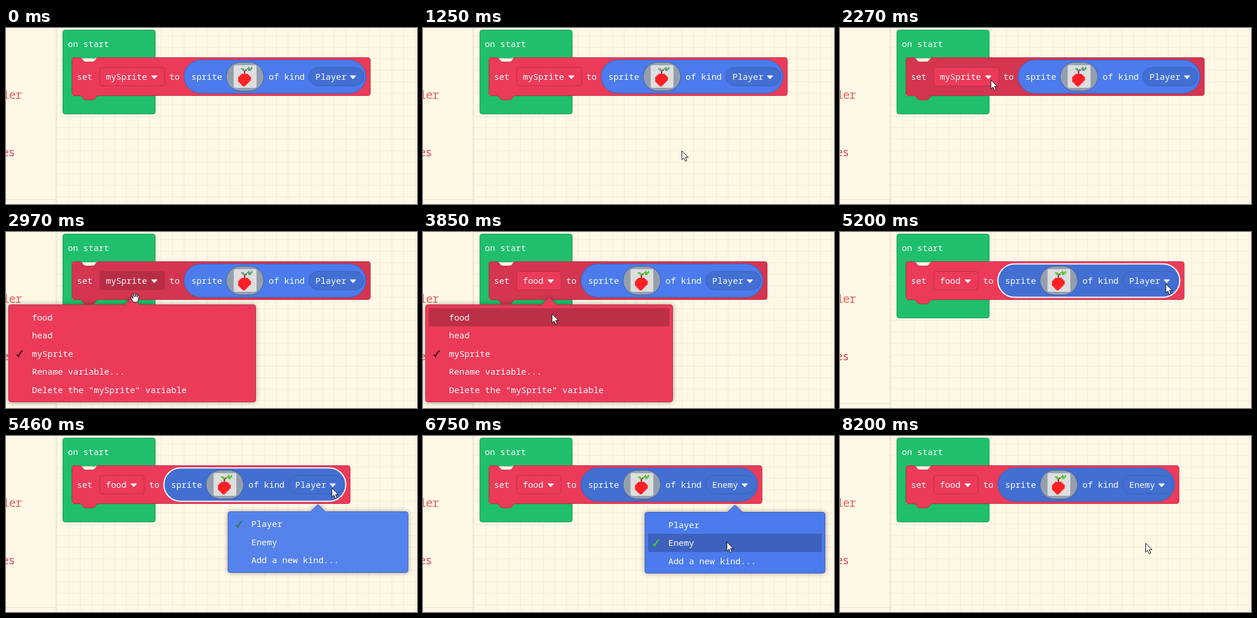
An HTML page for the animation above (8250 ms loop, 712 by 306 pixels).

```html
<!DOCTYPE html>
<html lang="en">
<head>
<meta charset="utf-8">
<title>Block editor</title>
<style>
html, body { margin: 0; width: 100%; height: 100%; overflow: hidden; background: #fff8e6; }
svg { display: block; width: 712px; height: 306px; }
text { font: 500 14.9px "Noto Sans Mono", "DejaVu Sans Mono", monospace; fill: #fff; }
.side text { font-size: 20px; letter-spacing: -1px; fill: #e2605a; }
.menu { filter: drop-shadow(0 0 4px rgba(0, 0, 0, .35)); }
</style>
</head>
<body>
<svg viewBox="0 0 712 306">
  <defs>
    <pattern id="grid" x="88" y="13" width="20" height="20" patternUnits="userSpaceOnUse">
      <path d="M.5 0V20M0 .5H20" stroke="#f3ead6" fill="none"/>
    </pattern>
    <path id="caret" d="M-5-2.5H5L0 3Z" fill="#fff" stroke="#fff" stroke-linejoin="round"/>
    <path id="tick" d="M-5.5 1.5L-2.5 5Q0-2 5-5.5" fill="none" stroke-width="2.6"/>
  </defs>

  <rect x="86" width="626" height="306" fill="url(#grid)"/>
  <g class="side">
    <rect width="86" height="306" fill="#fff8e7"/>
    <path d="M86.5 0V306M0 298.5H86" stroke="#e6dfd2"/>
    <path d="M88 0V306" stroke="#f5eddc" stroke-width="2"/>
    <text x="-6" y="123">ler</text>
    <text x="-7" y="223" style="fill:#e03f54">es</text>
  </g>

  <path d="M102.500 3.500H254.500Q258.500 3.500 258.500 7.500V52H114V118H258.500V146Q258.500 149.500 254.500 149.500H102.500Q98.500 149.500 98.500 145.500V7.500Q98.500 3.500 102.500 3.500Z" fill="#20bf6b" stroke="#1a9956"/>
  <text x="107" y="33">on start</text>

  <path id="setBlock" stroke="#bb2f47"/>
  <text x="123" y="90">set</text>
  <rect id="varField" x="162.5" y="68.5" height="32" rx="4" stroke="#bb2f47"/>
  <text id="varName" x="173" y="90"></text>
  <use id="varCaret" href="#caret"/>
  <text id="to" y="90">to</text>

  <g id="sprite">
    <rect id="body" x="308.5" y="55.5" height="58" rx="29"/>
    <text x="321" y="90">sprite</text>
    <rect x="381.500" y="59.500" width="65" height="50" rx="25" fill="#949fae" stroke="#3d5d9f"/>
    <rect x="394.500" y="64.500" width="39.500" height="39.500" rx="3" fill="#dedede"/>
    <g transform="translate(395 65) scale(2.44)">
      <path id="leaves" d="M5 2h2v1h1v1h-2v-1h-1zM9 2h1v-1h1v1h1v-1h1v2h-1v1h-2v-1h-1z"/>
      <path d="M8 3h1v1h-1v2h-1v-2h1z" fill="#8f2d35"/>
      <path d="M5 6h5v1h1v1h1v3h-1v1h-1v1h-1v1h-1v1h-2v-1h-1v-1h-1v-1h-1v-4h1v-1h1z" fill="#fb2024"/>
    </g>
    <text x="455" y="90">of kind</text>
    <rect id="kindField" x="524.500" y="68.500" height="32" rx="16" fill="#436fd3" stroke="#3a60b9"/>
    <text id="kindName" x="536" y="90"></text>
    <use id="kindCaret" href="#caret"/>
  </g>

  <g id="varMenu" class="menu"></g>
  <g id="kindMenu" class="menu"></g>

  <path id="arrow" d="M.5.5V16L4 12.700L6.600 18.700L9.200 17.600L6.700 11.700H11.500Z" fill="#fff" stroke="#111"/>
  <path id="hand" d="M4.500 16.500C3 14 1.500 11.500.5 9.500C0 8 1.500 7.300 2.600 8.300L4 10L2.700 4.200C2.300 2.600 4.200 2.200 4.700 3.600L6 7.500V2C6 .3 8.200.3 8.300 2L8.500 7.300L9.800 2.700C10.200 1.200 12 1.700 11.800 3.200L11 8L13 5C13.800 3.800 15.400 4.600 14.900 6C14 8.500 13.500 10 13.200 12C13 14 12.500 15 12 16.500Z" fill="#fff" stroke="#111"/>
</svg>
<script>
const LOOP = 8250, STEP = 65, CHAR = 8.94, ROW = 31.5;
const $ = id => document.getElementById(id);
const set = (el, attrs) => { for (const k in attrs) el.setAttribute(k, attrs[k]); };

// Screen updates come in bursts of evenly spaced steps
const bursts = [0, 920, 2270, 2400, 2970, 3350, 3850, 4300, 5020, 5200, 6050, 6750, 7820, 8200];
const snap = t => {
  const start = bursts.filter(b => b <= t).pop();
  return start + STEP * Math.floor((t - start) / STEP);
};

// time, x, y
const path = [
  [920, 557, 280], [1700, 267, 102], [1765, 267, 99], [2020, 261, 90],
  [2400, 261, 90], [2970, 224, 114], [3100, 220, 121], [3170, 221, 124],
  [3340, 221, 124], [3540, 223, 142], [3915, 223, 142], [4300, 531, 112],
  [4690, 555, 93], [4820, 554.5, 83.5], [5010, 554.5, 83.5], [5020, 564, 90],
  [5590, 564, 90], [6370, 531, 179], [6700, 526, 184], [7800, 526, 184],
  [7870, 528, 185], [8199, 528, 185], [8200, 529, 186]
];

function cursorAt(t) {
  const i = path.findIndex(p => p[0] > t);
  if (i < 0) return path[path.length - 1].slice(1);
  const a = path[Math.max(i - 1, 0)], b = path[i];
  const p = Math.max(0, (t - a[0]) / (b[0] - a[0] || 1));
  const e = p * p * (3 - 2 * p);
  return [a[1] + (b[1] - a[1]) * e, a[2] + (b[2] - a[2]) * e];
}

const menus = [
  { el: $("varMenu"), x: 4, y: 126, w: 429, opens: 2400, closes: 3850,
    fill: "#ec3b59", edge: "#bb2f47", tick: "#5c1422", checked: () => 2,
    items: ["food", "head", "mySprite", "Rename variable...", 'Delete the "mySprite" variable'] },
  { el: $("kindMenu"), x: 384, y: 132, w: 313, opens: 5285, closes: 6750,
    fill: "#4b7bec", edge: "#3d61bc", tick: "#28705a", checked: t => t < 6750 ? 0 : 1,
    items: ["Player", "Enemy", "Add a new kind..."] }
];

for (const m of menus) {
  m.h = m.items.length * ROW + 12.5;
  const mid = m.x + m.w / 2, r = m.x + m.w - .5, b = m.y + m.h - .5, l = m.x + .5, y = m.y + .5;
  m.el.innerHTML =
    `<path d="M${l + 4} ${y}H${mid - 13}L${mid - 2} ${y - 11}Q${mid} ${y - 13} ${mid + 2} ${y - 11}L${mid + 13} ${y}` +
    `H${r - 4}Q${r} ${y} ${r} ${y + 4}V${b - 4}Q${r} ${b} ${r - 4} ${b}H${l + 4}Q${l} ${b} ${l} ${b - 4}V${y + 4}Q${l} ${y} ${l + 4} ${y}Z" ` +
    `fill="${m.fill}" stroke="${m.edge}"/>` +
    `<rect x="${m.x + 6}" width="${m.w - 12}" height="${ROW}" fill="${m.edge}"/><use href="#tick"/>` +
    m.items.map((s, i) => `<text x="${m.x + 41}" y="${m.y + 27.5 + i * ROW}">${s}</text>`).join("");
  [, m.hover, m.check] = m.el.children;
}

const ease = p => 1 - Math.pow(1 - Math.min(1, Math.max(0, p)), 2.3);

function drawMenu(m, t, x, y) {
  const shown = t < m.closes ? ease((t - m.opens) / 250) : 1 - ease((t - m.closes) / 250);
  m.el.style.display = shown > 0 ? "" : "none";
  if (shown <= 0) return;
  set(m.el, { opacity: shown, transform: `translate(0 ${-16 * (1 - shown)})` });
  if (t < m.closes + 100) {
    const row = Math.floor((y - m.y - 6.5) / ROW);
    const over = x > m.x && x < m.x + m.w && row >= 0 && row < m.items.length;
    set(m.hover, { y: m.y + 6.5 + row * ROW, visibility: over ? "visible" : "hidden" });
  }
  const n = m.checked(t);
  set(m.check, {
    transform: `translate(${m.x + 20} ${m.y + 22.5 + n * ROW})`,
    stroke: n === 1 ? "#3fc43c" : m.tick
  });
}

function drawBlocks(t, x, y) {
  const name = t < 3850 ? "mySprite" : "food";
  const kind = t < 6750 ? "Player" : "Enemy";
  const shift = name === "food" ? -35 : 0;
  const varW = name.length * CHAR + 41;
  const kindW = kind.length * CHAR + 42;
  const bodyR = 528 + kindW + shift, right = bodyR + 7.5;
  const setPicked = t >= 2270 && t < 5200, spritePicked = t >= 5200;
  const varOpen = t >= 2400 && t < 3850;

  set($("setBlock"), {
    d: `M118 51.500H128C132 51.500 133 59 138 59H150C155 59 156 51.500 160 51.500H${right - 4}Q${right} 51.500 ${right} 55.500` +
       `V113.500Q${right} 117.500 ${right - 4} 117.500H160C156 117.500 155 125 150 125H138C133 125 132 117.500 128 117.500` +
       `H118Q114.500 117.500 114.500 113.500V55.500Q114.500 51.500 118 51.500Z`,
    fill: setPicked ? "#d43550" : "#ec3b59"
  });
  set($("varField"), { width: varW, fill: varOpen ? "#b82d46" : "#ec3b59" });
  $("varName").textContent = name;
  set($("varCaret"), { transform: `translate(${162 + varW - 17.5} 85.5)` });
  set($("to"), { x: 283 + shift });

  const outlined = t >= 4700 && y < 115;
  set($("sprite"), { transform: `translate(${shift} 0)` });
  set($("body"), {
    width: bodyR - shift - 308.5,
    fill: spritePicked ? "#436fd3" : "#4b7bec",
    stroke: outlined ? "#fff" : "#3a60b9",
    "stroke-width": outlined ? 2 : 1
  });
  set($("leaves"), { fill: shift ? "#55c83c" : "#58a37c" });
  set($("kindField"), { width: kindW });
  $("kindName").textContent = kind;
  set($("kindCaret"), { transform: `translate(${524 + kindW - 18.5} 85.5)` });

  const inField = y > 68 && y < 101 &&
    (x > 162 && x < 162 + varW || x > 524 + shift && x < 524 + shift + kindW);
  return x > 114 && x < right && y > 51 && y < 118 && !inField;
}

function frame(now) {
  const t = snap(now % LOOP);
  const [x, y] = cursorAt(t);
  const grab = drawBlocks(t, x, y);
  menus.forEach(m => drawMenu(m, t, x, y));
  const live = t >= 920;
  set($("arrow"), { transform: `translate(${x} ${y})`, visibility: live && !grab ? "visible" : "hidden" });
  set($("hand"), { transform: `translate(${x - 8} ${y - 8.5})`, visibility: live && grab ? "visible" : "hidden" });
  requestAnimationFrame(frame);
}
frame(performance.now());
</script>
</body>
</html>
```
